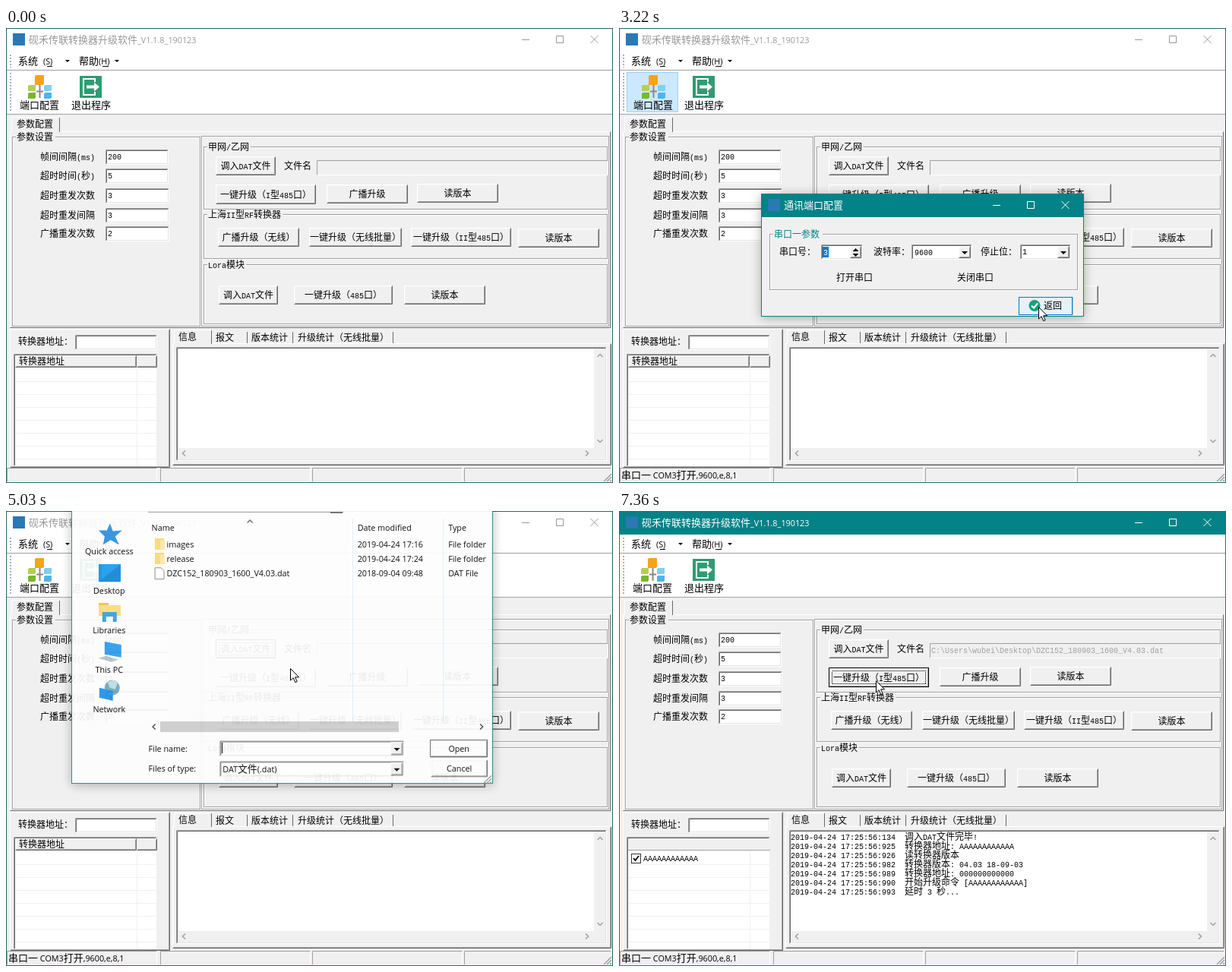
An HTML page for the animation above (8 s loop, 799 by 599 pixels).

```html
<!DOCTYPE html>
<html lang="zh-CN">
<head>
<meta charset="utf-8">
<style>
  html, body { margin: 0; height: 100%; overflow: hidden; background: #f0f0f0; }
  svg { display: block; width: 100vw; height: 100vh; }
  text { white-space: pre; font: 12px "Noto Sans CJK SC", "Noto Sans CJK", sans-serif; }
  tspan { font: 10px "Liberation Mono", monospace; }
  .ui { font-size: 13px; }
  .ui tspan { font: 10.8px "Open Sans", "Noto Sans", sans-serif; }
  rect { shape-rendering: crispEdges; }
  .popup { filter: drop-shadow(0 2px 7px rgba(0, 0, 0, .3)); }
</style>
</head>
<body>
<svg id="stage" viewBox="0 0 799 599"></svg>
<script>
const TEAL = '#038387', FACE = '#f0f0f0', GRAY = '#a0a0a0', DARK = '#696969', LOGO = '#2b78b4';

// ---- drawing helpers, all returning SVG markup ----
const rect = (x, y, w, h, fill, more = '') =>
  `<rect x="${x}" y="${y}" width="${w}" height="${h}" fill="${fill}" ${more}/>`;
const outline = (x, y, w, h, color, fill = 'none', more = '') =>
  rect(x + .5, y + .5, w - 1, h - 1, fill, `stroke="${color}" ${more}`);
const line = (d, color, more = '') => `<path d="${d}" fill="none" stroke="${color}" ${more}/>`;
const shape = (d, fill, more = '') => `<path d="${d}" fill="${fill}" ${more}/>`;
const text = (x, y, s, fill = '#000', more = '') =>
  `<text x="${x}" y="${y}" fill="${fill}" ${more}>${s.replace(/[ -~]+/g, '<tspan>$&</tspan>')}</text>`;
const ui = (x, y, s, fill, more = '') => text(x, y, s, fill, `class="ui" ${more}`);
const group = (id, content, more = '') => `<g id="${id}" ${more}>${content}</g>`;
const MIDDLE = 'text-anchor="middle"';

const edge = (x, y, w, h, topLeft, bottomRight) =>
  line(`M${x + .5} ${y + h - .5}V${y + .5}H${x + w - .5}`, topLeft) +
  line(`M${x + .5} ${y + h - .5}H${x + w - .5}V${y + .5}`, bottomRight);
const raised = (x, y, w, h, fill = FACE) => rect(x, y, w, h, fill) +
  edge(x, y, w, h, '#fff', DARK) + edge(x + 1, y + 1, w - 2, h - 2, '#f4f4f4', GRAY);
const sunken = (x, y, w, h, fill = '#fff') => rect(x, y, w, h, fill) +
  edge(x, y, w, h, GRAY, '#fff') + edge(x + 1, y + 1, w - 2, h - 2, DARK, '#e3e3e3');
const etched = (x, y, w, h) => outline(x + 1, y + 1, w, h, '#fff') + outline(x, y, w, h, GRAY);
const groupBox = (x, y, w, h, label, width, color) =>
  etched(x, y, w, h) + rect(x + 5, y - 2, width + 3, 5, FACE) + text(x + 6, y + 5, label, color);
const button = (x, y, w, h, label) =>
  raised(x, y, w, h) + text(x + w / 2, y + h / 2 + 4.5, label, '#000', MIDDLE);
const focusRing = (x, y, w, h) => outline(x, y, w, h, '#000') +
  outline(x + 4, y + 4, w - 8, h - 8, '#000', 'none', 'stroke-dasharray="1"');
const edit = (x, y, w, value) => sunken(x, y, w, 20) + text(x + 3, y + 13, value);
const triangle = (x, y, r, dir = 1) => shape(`M${x - r} ${y}h${2 * r}l${-r} ${r * dir}z`, '#000');
const combo = (x, y, w, h) =>
  sunken(x, y, w, h) + raised(x + w - 18, y + 2, 16, h - 4) + triangle(x + w - 10, y + h / 2 - 1, 4);
const chevron = (x, y, angle, color = GRAY) =>
  line('M-3.5 2L0 -1.5L3.5 2', color, `stroke-width="1.5" transform="translate(${x} ${y}) rotate(${angle})"`);
const grip = (x, y, h) => line(`M${x} ${y}v${h}`, '#b0b0b0', 'stroke-width="2" stroke-dasharray="2"');
const windowButtons = (x, y) =>
  line(`M${x} ${y + .5}h10m35.5 -5h9v9h-9zm45 -.5l10 10m0 -10l-10 10`, 'currentColor');

// ---- main window ----
const titleBar = group('title',
  rect(0, 0, 799, 31, '#fff', 'id="titleFill"') + rect(9, 7, 16, 16, LOGO) +
  ui(30, 20, '砚禾传联转换器升级软件_V1.1.8_190123', 'currentColor') + windowButtons(679, 15));

const block = (x, y, w, h, fill) => rect(x, y, w, h, fill, 'rx="2"');
const toolbar =
  rect(0, 31, 799, 82, '#fff') + rect(0, 55, 799, 1, GRAY) + rect(0, 113, 799, 1, GRAY) +
  grip(6, 35, 17) + grip(6, 59, 51) +
  ui(16, 48, '系统') + ui(49, 48, '(S)') + rect(54, 50, 7, 1, '#000') + triangle(81, 42, 3) +
  ui(96, 48, '帮助(H)') + rect(127, 50, 8, 1, '#000') + triangle(146, 42, 3) +
  group('portHover', outline(10, 58, 68, 53, '#99d1ff', '#cce8ff')) +
  group('portButton',
    line('M44.5 75v17M40 83.5h9', '#888', 'stroke-width="2"') +
    block(38, 62, 12, 13, '#f7a21b') + block(29, 75, 10, 8, '#b5cf52') + block(29, 85, 10, 8, '#78b82a') +
    block(50, 75, 10, 8, '#7fd0f2') + block(50, 85, 10, 8, '#4db5ea') +
    ui(18, 106, '端口配置')) +
  rect(97, 63, 29, 29, '#2f9c73') +
  line('M117 71v-4h-15v21h15v-4', '#fff', 'stroke-width="2"') +
  shape('M106 75.5h10v-4l7 6-7 6v-4h-10z', '#fff') +
  ui(86, 106, '退出程序');

const settings = [
  ['帧间间隔(ms)', '200', 160], ['超时时间(秒)', '5', 185], ['超时重发次数', '3', 211],
  ['超时重发间隔', '3', 237], ['广播重发次数', '2', 261]];
const parameterPage =
  edge(5, 136, 791, 259, '#fff', DARK) +
  rect(7, 117, 63, 20, FACE) + edge(7, 117, 64, 20, '#fff', FACE) + line('M70.5 118V137', DARK) +
  text(14, 131, '参数配置') +
  groupBox(8, 143, 248, 250, '参数设置', 49) +
  settings.map(([label, value, y]) => text(45, y + 14, label) + edit(131, y, y < 200 ? 83 : 84, value)).join('') +
  etched(257, 142, 537, 251) +
  groupBox(260, 156, 532, 83, '甲网/乙网', 54) +
  groupBox(260, 245, 532, 59, '上海II型RF转换器', 96) +
  groupBox(260, 311, 532, 79, 'Lora模块', 48) +
  button(276, 169, 79, 25, '调入DAT文件') + text(366, 186, '文件名') +
  rect(409, 174, 384, 20, FACE) + edge(409, 174, 384, 20, GRAY, '#fff') +
  group('path', text(411, 187, 'C:\\Users\\wubei\\Desktop\\DZC152_180903_1600_V4.03.dat', GRAY)) +
  button(276, 206, 132, 26, '一键升级（I型485口）') + button(422, 206, 107, 25, '广播升级') +
  button(541, 205, 107, 25, '读版本') +
  button(279, 263, 107, 25, '广播升级（无线）') + button(399, 263, 122, 25, '一键升级（无线批量）') +
  button(533, 263, 132, 25, '一键升级（II型485口）') + button(674, 264, 107, 25, '读版本') +
  button(280, 339, 78, 25, '调入DAT文件') + button(379, 339, 130, 25, '一键升级（485口）') +
  button(524, 339, 107, 25, '读版本') +
  group('loadFocus', focusRing(276, 169, 79, 25)) + group('upgradeFocus', focusRing(276, 206, 132, 26));

const gridRows = Array.from({ length: 7 }, (_, i) => rect(12, 465 + 17 * i, 187, 1, FACE)).join('');
const addressPanel =
  edge(5, 396, 211, 183, '#fff', DARK) + edge(6, 397, 209, 181, FACE, GRAY) +
  text(16, 417, '转换器地址：') + sunken(91, 404, 108, 20) +
  rect(10, 429, 189, 148, '#fff') + edge(10, 429, 189, 148, GRAY, FACE) + edge(11, 430, 187, 147, DARK, '#fff') +
  gridRows + rect(172, 447, 1, 130, FACE) + rect(12, 431, 187, 16, FACE) + rect(12, 446, 187, 1, GRAY) +
  group('listHeader', raised(12, 431, 160, 16) + raised(172, 431, 27, 16) + text(17, 443, '转换器地址')) +
  group('listRow', outline(16, 451, 13, 13, '#333', '#fff') +
    line('M19 457l2.5 3 4.5-6', '#000', 'stroke-width="1.8"') + text(32, 461, 'AAAAAAAAAAAA'));

const log = ['134  调入DAT文件完毕!', '925  转换器地址: AAAAAAAAAAAA', '926  读转换器版本',
  '982  转换器版本: 04.03 18-09-03', '989  转换器地址: 000000000000',
  '990  开始升级命令 [AAAAAAAAAAAA]', '993  延时 3 秒...'];
const logPanel =
  edge(219, 415, 578, 161, '#fff', DARK) + edge(220, 416, 576, 159, FACE, GRAY) +
  rect(221, 397, 49, 20, FACE) + line('M221.5 417V397.5H270', '#fff') +
  line('M270.5 398V416M317.5 400V415M377.5 400V415M509.5 400V415', DARK) +
  text(227, 411, '信息') + text(276, 412, '报文') + text(323, 412, '版本统计') +
  text(384, 412, '升级统计（无线批量）') +
  sunken(224, 420, 567, 150) + rect(774, 422, 15, 146, FACE) + rect(226, 553, 563, 15, FACE) +
  chevron(782, 431, 0) + chevron(782, 544, 180) + chevron(234, 560, -90) + chevron(765, 560, 90) +
  log.map((s, i) => group('log' + i, text(226, 433 + 12 * i, '2019-04-24 17:25:56:' + s))).join('');

const statusBar =
  [1, 203, 403, 603].map((x, i) => edge(x, 579, i < 3 ? 198 : 194, 19, GRAY, '#fff')).join('') +
  line('M787 597l10 -10M791 597l6 -6M795 597l2 -2', GRAY, 'stroke-width="1.5"') +
  group('status', ui(3, 593, '串口一 COM3打开,9600,e,8,1'));

// ---- port dialog ----
const portDialog =
  rect(188, 218, 423, 161, FACE) + rect(188, 218, 423, 31, TEAL) + outline(187, 218, 425, 162, TEAL) +
  rect(196, 225, 16, 16, LOGO) + ui(217, 238, '通讯端口配置', '#fff') +
  `<g color="#fff">${windowButtons(492, 233)}</g>` +
  groupBox(198, 271, 406, 74, '串口一参数', 62, TEAL) +
  text(211, 299, '串口号：') + sunken(266, 285, 55, 20) + rect(268, 288, 8, 14, '#0078d7') +
  text(269, 299, '3', '#fff') + raised(304, 287, 15, 16) + triangle(311.5, 294, 4, -1) + triangle(311.5, 297, 4) +
  text(335, 299, '波特率：') + combo(385, 285, 80, 20) + text(389, 299, '9600') +
  text(476, 299, '停止位：') + combo(528, 285, 67, 20) + text(531, 298, '1') +
  text(286, 333, '打开串口') + text(445, 333, '关闭串口') +
  outline(526, 354, 72, 24, '#c4c4c4', '#ececec') +
  group('returnHover', outline(526, 354, 71, 24, '#0078d7', '#e5f1fb')) +
  '<circle cx="547" cy="365.5" r="7.5" fill="#12a37f"/>' +
  line('M543 365.5l3 3 5-6', '#fff', 'stroke-width="2"') + text(559, 370, '返回');

// ---- file dialog ----
const places = ['Quick access', 'Desktop', 'Libraries', 'This PC', 'Network'];
const folder = y => rect(195, y, 12, 15, '#f9d977') + rect(202, y + 2, 6, 13, '#fbe7a3');
const placeIcons =
  shape('M136 16l4 10 12-1-9 8 5 11-11-6-10 6 2-11-8-8 11 0z', '#2d8fdd') +
  rect(121, 70, 29, 23, '#1a9cec') + shape('M121 93L150 70V93z', '#1484d6') +
  rect(121, 121, 13, 8, '#f3c04b') + rect(121, 124, 29, 14, '#fbdc7c') +
  shape('M126 146v-13h19v13h-5v-7h-9v7z', '#3a9fe0') +
  shape('M129 172l22 4v17l-22-4z', '#2d9cec') + shape('M121 194l10-3 16 5-9 3z', '#b9c2c9') +
  '<circle cx="139" cy="233" r="10" fill="#6fa8bd"/>' + shape('M133 226q8-6 13 1l-3 8-7-2z', '#bddce2') +
  shape('M122 233l18 4v13l-18-4z', '#2492e6');
const dialogButton = (x, y, w, h, label) =>
  raised(x, y, w, h, '#fdfdfd') + ui(x + w / 2, y + h / 2 + 4, label, '#000', MIDDLE);
const fileRow = (y, name, date, type) => ui(211, y, name) + ui(463, y, date) + ui(583, y, type);
const fileDialog =
  outline(85, -70, 557, 430, '#3f7f81', '#fdfdfd') +
  rect(186, 0, 258, 1, GRAY) + rect(427, 0, 16, 2, DARK) +
  group('placeHover', rect(92, 116, 93, 44, '#f1f1f1')) + placeIcons +
  places.map((s, i) => ui(135, 57 + 52 * i, s, '#000', MIDDLE)).join('') +
  rect(456, 10, 1, 267, '#e3eef7') + rect(576, 10, 1, 267, '#e3eef7') +
  chevron(321, 13, 0, '#666') +
  ui(191, 26, 'Name') + ui(463, 26, 'Date modified') + ui(583, 26, 'Type') +
  group('rowHover', outline(189, 73, 446, 18, '#99d1ff', '#cce8ff')) +
  folder(36) + folder(55) + shape('M195.500 74.500h8l4 4v11h-12z', '#fff', 'stroke="#888"') +
  fileRow(48, 'images', '2019-04-24 17:16', 'File folder') +
  fileRow(67, 'release', '2019-04-24 17:24', 'File folder') +
  fileRow(86, 'DZC152_180903_1600_V4.03.dat', '2018-09-04 09:48', 'DAT File') +
  rect(202, 277, 316, 15, '#cdcdcd') + chevron(194, 284.5, -90, '#444') + chevron(627, 284.5, 90, '#444') +
  ui(187, 318, 'File name:') + combo(281, 303, 244, 21) +
  group('caret', rect(284, 306, 1, 14, '#000')) +
  group('fileName', ui(284, 318, 'DZC152_180903_1600_V4.03.dat')) +
  ui(187, 344, 'Files of type:') + combo(281, 330, 244, 21) + ui(285, 345, 'DAT文件(.dat)') +
  dialogButton(559, 302, 76, 23, 'Open') + outline(559, 302, 76, 23, DARK) +
  dialogButton(560, 328, 75, 23, 'Cancel') +
  line('M630 359l10 -10M634 359l6 -6M638 359l2 -2', GRAY, 'stroke-width="1.5"') +
  group('tooltip', outline(332, 110, 178, 44, '#bbb', '#fff') +
    ['Type: DAT File', 'Size: 106 KB', 'Date modified: 2018-09-04 09:48']
      .map((s, i) => ui(337, 123 + 13 * i, s, '#555')).join(''));

const pointer = group('pointer',
  group('click', '<circle cx="1" cy="-1" r="11.5" fill="#e0343f" opacity=".78"/>') +
  shape('M.5 .5V16l3.600-3.400 2.700 6 2.400-1-2.600-5.800h5z', '#fff', 'stroke="#000"'));

document.getElementById('stage').innerHTML =
  rect(0, 0, 799, 599, FACE) + titleBar + toolbar + parameterPage + addressPanel + logPanel + statusBar +
  outline(0, 0, 799, 599, '#2a6769', 'none', 'id="border"') +
  group('portDialog', portDialog, 'class="popup"') + group('fileDialog', fileDialog, 'class="popup"') + pointer;

// ---- timeline ----
const LOOP = 8000;
// The picture rests between them.
const bursts = [[100, 800, 9], [1180, 1970, 11], [2060, 2840, 11], [2900, 3220, 5], [3390, 4140, 11],
  [4230, 4230, 1], [4380, 4630, 4], [4780, 5220, 6], [5430, 6190, 11], [6270, 6880, 9], [7200, 7360, 3]];
const pointerPath = [[0, 425, 640], [99, 425, 610], [100, 418, 582], [800, 53, 85], [1420, 53, 85],
  [1970, 392, 277], [2060, 390, 279], [2450, 310, 322], [2820, 310, 322], [3220, 552, 367], [3560, 552, 367],
  [4140, 317, 183], [4230, 315, 181], [4700, 315, 181], [5044, 374, 207], [5220, 378, 194], [5400, 378, 194],
  [5660, 329, 83], [6420, 329, 83], [6880, 338, 223]];
const portFade = [[1300, 0], [1338, .3], [1417, .85], [1496, 1], [3400, 1], [3640, 0]];
const fileFade = [[4740, 0], [4780, .1], [4868, .35], [4956, .7], [5044, .93], [5132, 1], [6340, 1], [6570, 0]];
const clicks = [1180, 2520, 3390, 4380, 6030, 6270, 7200];

function snap(t) {
  const burst = bursts.filter(b => b[0] <= t).pop();
  if (!burst) return 0;
  const [start, end, steps] = burst;
  if (steps < 2) return start;
  const step = (end - start) / (steps - 1);
  return start + step * Math.min(steps - 1, Math.floor((t - start) / step + .2));
}

function track(keys, t) {
  const next = keys.findIndex(k => k[0] > t);
  if (next < 1) return keys[next ? keys.length - 1 : 0].slice(1);
  const a = keys[next - 1], b = keys[next];
  const u = (t - a[0]) / (b[0] - a[0]), eased = u * u * (3 - 2 * u);
  return a.slice(1).map((v, i) => v + (b[i + 1] - v) * eased);
}

const el = id => document.getElementById(id);
const show = (id, on) => { el(id).style.display = on ? '' : 'none'; };
function popup(id, k, cx, cy) {
  show(id, k > 0);
  el(id).style.opacity = k;
  el(id).setAttribute('transform', `translate(${cx} ${cy}) scale(${.95 + .05 * k}) translate(${-cx} ${-cy})`);
}

function draw(t) {
  const q = snap(t), during = (from, to = LOOP) => q >= from && q < to;

  const active = during(1180, 1330) || during(3540, 4620) || during(6420);
  el('title').style.color = active ? '#fff' : '#999';
  el('titleFill').setAttribute('fill', active ? TEAL : '#fff');
  el('border').setAttribute('stroke', active ? TEAL : '#2a6769');

  const hover = during(1180, 3620);
  show('portHover', hover);
  el('portButton').setAttribute('transform', `translate(${hover ? 1 : 0} 0)`);
  show('status', during(2590));
  show('returnHover', during(3140, 3640));
  show('loadFocus', during(4380, 7200));
  show('upgradeFocus', during(7200));
  show('path', during(6490));
  show('listHeader', !during(7270));
  show('listRow', during(7270));
  const lines = during(7350) ? 7 : during(7270) ? 4 : during(6490) ? 1 : 0;
  log.forEach((_, i) => show('log' + i, i < lines));

  popup('portDialog', track(portFade, q)[0], 399.5, 299);
  popup('fileDialog', track(fileFade, q)[0], 363.5, 145);
  show('placeHover', during(5130));
  show('rowHover', during(5640));
  show('tooltip', during(5800, 6030));
  show('fileName', during(6030));
  show('caret', !during(6030));

  const [x, y] = track(pointerPath, q);
  el('pointer').setAttribute('transform', `translate(${x} ${y})`);
  show('click', clicks.some(c => during(c, c + 75)));
}

function tick() {
  draw(performance.now() % LOOP);
  requestAnimationFrame(tick);
}
tick();
</script>
</body>
</html>
```
